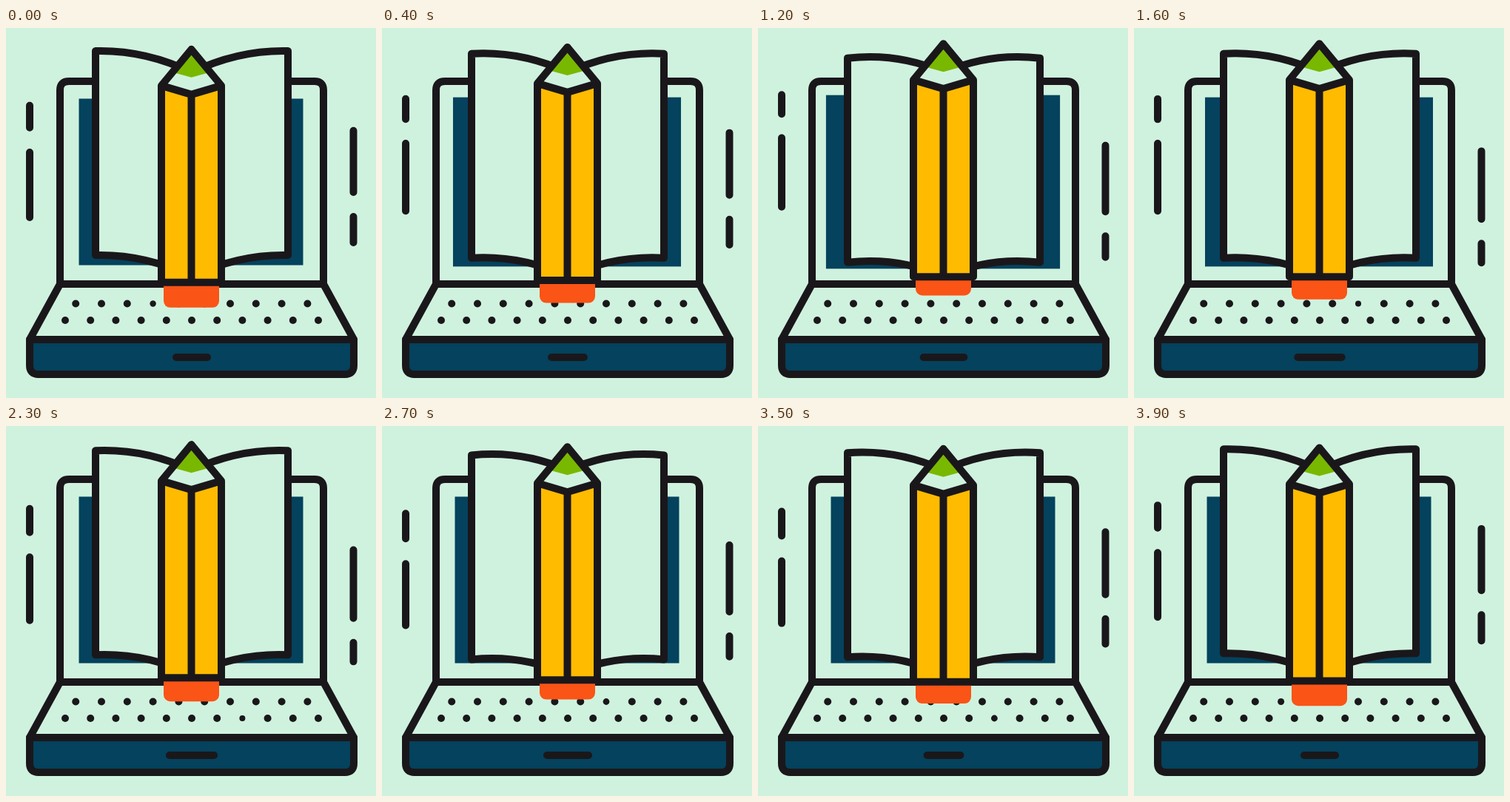
Animation, 500 px wide and 500 px high, one loop 4000 ms. Source, as an HTML page:

```html
<!DOCTYPE html>
<html lang="en">
<head>
<meta charset="utf-8">
<title>Laptop, book and pencil</title>
<style>
  html, body { margin: 0; width: 100%; height: 100%; overflow: hidden; background: #cff2de; }
  svg { display: block; width: 100vw; height: 100vh; }
  .line { stroke: #1a171b; stroke-width: 10; stroke-linecap: round; stroke-linejoin: round; fill: none; }
  .paper { fill: #cff2de; }
  .navy { fill: #04425d; }
</style>
</head>
<body>
<svg viewBox="0 0 500 500">
  <path class="line paper" d="M73 346V84Q73 72 85 72H417Q429 72 429 84V346Z"/>
  <rect id="screen" class="navy"/>
  <path id="pageL" class="line paper"/>
  <path id="pageR" class="line paper"/>
  <path class="line paper" d="M73 346H429L470 421H32Z"/>
  <path class="line navy" d="M32 421H470V456Q470 468 458 468H44Q32 468 32 456Z"/>
  <path id="pad" class="line"/>
  <g id="keys" fill="#1a171b"></g>
  <rect id="eraser" x="213" y="325" width="75" rx="9" fill="#fa5416"/>
  <g id="pencil">
    <path class="paper" d="M210 78L250.5 29L291 78L250.5 90Z"/>
    <path fill="#79b800" d="M250.5 29L276 60L250.5 67L225 60Z"/>
    <path fill="#ffbb00" d="M210 78L250.5 90L291 78V344H210Z"/>
    <path class="line" d="M210 344V78L250.5 29L291 78V344ZM210 78L250.5 90L291 78M250.5 90V344" style="stroke-linecap:butt"/>
  </g>
  <path id="bars" class="line"/>
</svg>
<script>
const LOOP = 4000, TAU = Math.PI * 2;
const $ = id => document.getElementById(id);
const set = (el, attrs) => { for (const k in attrs) el.setAttribute(k, attrs[k]); };

// Keyboard dots: first x, spacing, y, count
const keys = [[94.2, 34.8, 372.5, 10], [80, 34.2, 395, 11]].map(([x, step, y, n]) =>
  Array.from({ length: n }, (_, i) => {
    const dot = document.createElementNS("http://www.w3.org/2000/svg", "circle");
    set(dot, { cx: x + i * step, cy: y, r: 5 });
    return $("keys").appendChild(dot);
  }));

// Key presses: row, column, time, depth
const presses = [
  [0, 3, 30, 0.8], [0, 2, 800, 1], [0, 6, 1600, 1],
  [1, 7, 2300, 1], [0, 6, 2700, 0.6], [1, 7, 3500, 0.6]
];

function page(side, d) {
  const x = dist => 251 + side * dist;
  const y = [31 + d, 30 + 0.6 * d, 39 + 0.2 * d, 60];
  const low = y.map(v => v + 276);
  return `M${x(130)} ${y[0]}C${x(87)} ${y[1]} ${x(43)} ${y[2]} ${x(0)} ${y[3]}` +
    `V${low[3]}C${x(43)} ${low[2]} ${x(87)} ${low[1]} ${x(130)} ${low[0]}Z`;
}

// Vertical bar given its outer ends
const bar = (x, top, end) => `M${x} ${top + 5}V${end - 5}`;

function draw(t) {
  const a = TAU * t / LOOP;
  const s = Math.sin(a), c = Math.cos(a);
  const pulse = (1 - Math.cos(2 * a)) / 2;

  const grow = t < LOOP / 2 ? 7.3 * pulse : 0;
  set($("screen"), {
    x: 98.5 - grow, y: 95.5 - grow * 0.73,
    width: 303 + 2 * grow, height: 225 + 1.46 * grow
  });

  set($("pageL"), { d: page(-1, 10.7 * pulse) });
  set($("pageR"), { d: page(1, 10.7 * pulse) });

  const lift = -3.4 - 5 * Math.cos(a - TAU * 0.35);
  set($("pencil"), { transform: `translate(0 ${lift + 0.3})` });
  set($("eraser"), { height: 53.3 + lift - 9.6 * pulse });

  const half = 25.8 - 4.8 * c;
  set($("pad"), { d: `M${251 - half} 445H${251 + half}` });

  set($("bars"), { d:
    bar(32, 99.8 - 15.2 * s, 139.8 - 19.5 * s) +
    bar(32, 163 - 20.5 * s, 261 - 15 * s) +
    bar(469.5, 149 - 15.3 * c, 247 - 20 * c) +
    bar(469.5, 270 - 20 * c, 310 - 15 * c)
  });

  keys.flat().forEach(dot => set(dot, { r: 5 }));
  for (const [row, col, at, depth] of presses) {
    const gap = Math.abs(t - at);
    const near = Math.min(gap, LOOP - gap) / 300;
    if (near < 1) set(keys[row][col], { r: 5 - depth * (1 + Math.cos(Math.PI * near)) / 2 });
  }
}

function tick() {
  draw(performance.now() % LOOP);
  requestAnimationFrame(tick);
}
tick();
</script>
</body>
</html>
```
